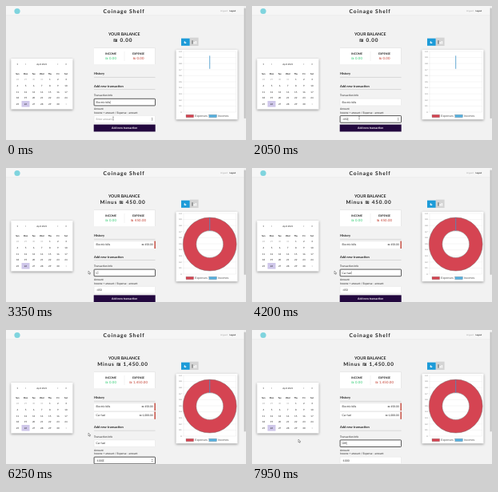
These frames come from a looping animation (300 px wide and 168 px high, 8 s). An HTML page:

```html
<!DOCTYPE html>
<html lang="en">
<head>
<meta charset="utf-8">
<title>Budget tracker</title>
<style>
  html, body { margin: 0; width: 100%; height: 100%; overflow: hidden; background: #f2f2f2; }
  svg { display: block; width: 100vw; height: 100vh; }
  text { font-family: Lato, "DejaVu Sans", sans-serif; fill: #222; text-rendering: geometricPrecision; white-space: pre; }
  .bold { font-weight: 700; }
  .arial text { font-family: "Liberation Sans", sans-serif; fill: #555; }
  .card { fill: #fff; filter: drop-shadow(0 1px 1.6px rgba(0, 0, 0, .4)); }
  .flat { fill: #fff; filter: drop-shadow(0 .4px .6px rgba(0, 0, 0, .25)); }
</style>
</head>
<body>
<svg id="stage" viewBox="0 0 300 168"></svg>
<script>
const LOOP = 8000, SUBMIT_1 = 2150, SUBMIT_2 = 6050, ROW = 10.8;
const RED = '#d54452', BLUE = '#56b1e0', DARK = '#222';
const stage = document.getElementById('stage');

function add(parent, tag, attrs = {}, content = '') {
  const node = document.createElementNS('http://www.w3.org/2000/svg', tag);
  for (const key in attrs) node.setAttribute(key, attrs[key]);
  node.textContent = content;
  return parent.appendChild(node);
}
const group = (attrs, parent = stage) => add(parent, 'g', attrs);
const rect = (parent, x, y, width, height, attrs) => add(parent, 'rect', { x, y, width, height, ...attrs });
const line = (parent, x1, y1, x2, y2, stroke, width = .5) =>
  add(parent, 'line', { x1, y1, x2, y2, stroke, 'stroke-width': width });
const label = (parent, x, y, size, content, attrs) =>
  add(parent, 'text', { x, y, 'font-size': size, ...attrs }, content);
const MID = { 'text-anchor': 'middle' };
const BOLD = { class: 'bold' };
const BOLD_MID = { ...MID, ...BOLD };

// Header and page scrollbar
rect(stage, 0, 0, 300, 11.5, { fill: '#f6f6f6' });
line(stage, 0, 11.6, 300, 11.6, '#e4e4e4', .4);
add(stage, 'circle', { cx: 14, cy: 6.5, r: 3.6, fill: '#7fd4de' });
label(stage, 147.5, 9, 6.7, 'Coinage Shelf', { ...BOLD_MID, 'letter-spacing': .85 });
label(stage, 268, 7.2, 2.5, 'Hi guest', { style: 'fill:#999' });
label(stage, 279.5, 7.2, 2.5, 'Logout', BOLD);
rect(stage, 297.3, 0, 2.7, 168, { fill: '#f1f1f1' });
const scrollThumb = rect(stage, 297.6, 2.6, 2.1, 0, { fill: '#c1c1c1' });

// Balance summary
label(stage, 147.7, 36.8, 5.2, 'YOUR BALANCE', BOLD_MID);
const balance = label(stage, 146, 44.6, 6.4, '', { ...BOLD_MID, 'letter-spacing': .75 });
rect(stage, 110, 52.5, 76.5, 20.5, { class: 'flat' });
line(stage, 148, 57, 148, 69, '#ddd', .4);
label(stage, 131, 60.8, 3.5, 'INCOME', BOLD_MID);
label(stage, 165.5, 60.8, 3.5, 'EXPENSE', BOLD_MID);
label(stage, 131, 67, 4.3, '₪ 0.00', { ...MID, style: 'fill:#2ecc71', 'letter-spacing': .15 });
const expense = label(stage, 165.5, 67, 4.3, '', { ...MID, style: 'fill:#c0392b', 'letter-spacing': .15 });

// History
label(stage, 110, 86.4, 4, 'History', BOLD);
line(stage, 110, 89.4, 186.5, 89.4, '#bbb');
const historyRows = [['Electric bills', '₪ 450.00'], ['Car fuel', '₪ 1,000.00']].map(([name, sum], i) => {
  const row = group({ transform: `translate(0 ${91.6 + i * ROW})` });
  rect(row, 110, 0, 76.5, 9.4, { class: 'flat' });
  rect(row, 185.5, 0, 1.3, 9.4, { fill: '#c0392b' });
  label(row, 112.5, 5.9, 3.4, name);
  label(row, 183.8, 5.9, 3.4, sum, { 'text-anchor': 'end' });
  return row;
});

// Form
const form = group({});
label(form, 110, 101.9, 4, 'Add new transaction', BOLD);
line(form, 110, 104.6, 186.5, 104.6, '#bbb');
label(form, 110, 113.3, 3.3, 'Transaction Info');
label(form, 110, 130.4, 3.3, 'Amount');
label(form, 110, 134.9, 3.3, 'Income + amount / Expense - amount');

function makeField(y) {
  const box = rect(form, 110.1, y, 76.4, 8.6, { fill: '#fff', rx: .7 });
  const mark = rect(form, 112.3, y + 2, 0, 4.7, { fill: '#5c9be6' });
  const text = label(form, 112.5, y + 5.5, 3.4, '');
  const caret = line(form, 0, y + 2.2, 0, y + 6.4, DARK, .25);
  return ({ value, placeholder = '', focused, selected }) => {
    text.textContent = value || placeholder;
    text.style.fill = selected ? '#fff' : value ? DARK : '#888';
    const width = value ? text.getComputedTextLength() : 0;
    box.setAttribute('stroke', focused ? DARK : '#ddd');
    box.setAttribute('stroke-width', focused ? .75 : .4);
    mark.setAttribute('width', selected ? width + .4 : 0);
    caret.setAttribute('x1', 112.8 + width);
    caret.setAttribute('x2', 112.8 + width);
    caret.style.display = focused && !selected ? '' : 'none';
  };
}
const infoField = makeField(116.3);
const amountField = makeField(137.6);
const spinner = add(form, 'path', { d: 'M181.8 141.2l.9 -1.2l.9 1.2zM181.8 142.6l.9 1.2l.9 -1.2z', fill: '#666' });
rect(form, 109.7, 148.6, 77, 8.9, { fill: '#23083f' });
label(form, 148.2, 154.2, 3.5, 'Add new transaction', { ...BOLD_MID, style: 'fill:#fff' });

// Calendar: the first cell is 28 March
rect(stage, 6.3, 66, 77.2, 63.5, { class: 'card' });
const column = i => 14.4 + i * 10.1;
[['«', 0], ['‹', 1], ['›', 5], ['»', 6]].forEach(([sign, i]) => label(stage, column(i), 74.2, 4, sign, MID));
label(stage, column(3), 74.2, 2.8, 'April 2021', MID);
['Sun', 'Mon', 'Tue', 'Wed', 'Thu', 'Fri', 'Sat'].forEach((day, i) => label(stage, column(i), 85.6, 2.7, day, BOLD_MID));
rect(stage, column(1) - 5, 119, 10, 7.6, { fill: '#cfc7ea' });
for (let i = 0; i < 35; i++) {
  const day = i - 3;
  const outside = day < 1 || day > 30;
  const shown = day < 1 ? day + 31 : day > 30 ? day - 30 : day;
  label(stage, column(i % 7), 93.3 + Math.floor(i / 7) * 7.6, 2.9, shown, { ...MID, style: `fill:${outside ? '#aaa' : DARK}` });
}

// Chart switch and chart
rect(stage, 219, 40.6, 10.8, 9.2, { fill: '#1d9bd8' });
add(stage, 'path', { d: 'M224 44a1.5 1.5 0 1 0 1.5 1.5h-1.5z', fill: '#e6f4fb' });
rect(stage, 229.8, 39.6, 10.8, 10.4, { fill: '#d4d4d4' });
[4.5, 2.6, 3.6].forEach((h, i) => rect(stage, 232.2 + i * 2.2, 47.6 - h, 1.5, h, { fill: i ? '#fafafa' : '#888' }));

rect(stage, 212.5, 54.8, 77, 87.5, { class: 'card' });
const chart = group({ class: 'arial' });
for (let i = 0; i <= 10; i++) {
  const y = 57 + i * 7.6;
  line(chart, 220.5, y, 287.5, y, '#e4e4e4', .35);
  label(chart, 219.5, y + .8, 2.4, i === 10 ? '0' : (1 - i / 10).toFixed(1), { 'text-anchor': 'end' });
}
line(chart, 222, 57, 222, 133, '#ddd', .35);
line(chart, 287.5, 57, 287.5, 133, '#e4e4e4', .35);
const ring = 2 * Math.PI * 25.2;
const center = { cx: 254.7, cy: 95.5, fill: 'none' };
const donut = add(chart, 'circle', {
  ...center, r: 25.2, stroke: RED, 'stroke-width': 16.6, transform: 'rotate(-90 254.7 95.5)'
});
const rims = [33.5, 16.9].map(r => add(chart, 'circle', { ...center, r, stroke: '#777', 'stroke-width': .45 }));
line(chart, 254.7, 62.3, 254.7, 78.8, '#3f94c8', .8);
[['Expenses', 225, RED], ['Incomes', 253.8, BLUE]].forEach(([name, x, fill]) => {
  rect(chart, x, 136.2, 9.6, 3.6, { fill, stroke: '#777', 'stroke-width': .3 });
  label(chart, x + 11, 139.3, 3.6, name);
});

// Mouse
const arrow = add(stage, 'path', { d: 'M0 0v3.8l.9 -.8l.6 1.4l.7 -.3l-.6 -1.3h1.2z', fill: '#fff', stroke: '#333', 'stroke-width': .4 });
const beam = add(stage, 'path', { d: 'M-.7 -2h1.4M0 -2v4M-.7 2h1.4', fill: 'none', stroke: '#333', 'stroke-width': .4 });
const mousePath = [
  [0, 134, 141], [2150, 134, 140], [2450, 132, 131], [2750, 132, 131], [3150, 103, 129],
  [6350, 103, 129], [6600, 128, 142], [6700, 128, 142], [7100, 58, 137], [LOOP, 58, 137]
];

const clamp = v => Math.min(1, Math.max(0, v));
const smooth = v => v * v * (3 - 2 * v);
const typed = (t, start, end, word) => word.slice(0, Math.ceil(clamp((t - start) / (end - start)) * word.length));
const show = (node, visible) => { node.style.display = visible ? '' : 'none'; };

function mouseAt(t) {
  const i = mousePath.findIndex(stop => stop[0] > t);
  const [t0, x0, y0] = mousePath[i - 1], [t1, x1, y1] = mousePath[i];
  const k = smooth((t - t0) / (t1 - t0));
  return [x0 + (x1 - x0) * k, y0 + (y1 - y0) * k];
}

function infoAt(t) {
  if (t < 3300) return 'Electric bills';
  if (t < 7250) return typed(t, 3300, 4150, 'Car fuel');
  return typed(t, 7250, 7900, 'Offi');
}

function draw(t) {
  const count = (t >= SUBMIT_1) + (t >= SUBMIT_2);
  balance.textContent = ['₪ 0.00', 'Minus ₪ 450.00', 'Minus ₪ 1,450.00'][count];
  expense.textContent = ['₪ 0.00', '₪ 450.00', '₪ 1,450.00'][count];
  historyRows.forEach((row, i) => show(row, i < count));
  form.setAttribute('transform', `translate(0 ${count * ROW})`);
  scrollThumb.setAttribute('height', 163 * 168 / (198 + count * ROW));

  const inInfo = t < 600 || (t >= 2450 && t < 4700) || t >= 6650;
  infoField({
    value: infoAt(t), focused: inInfo,
    selected: (t >= 2900 && t < 3300) || (t >= 6850 && t < 7250)
  });
  amountField({
    value: t < 5300 ? typed(t, 1150, 1900, '-450') : typed(t, 5300, 5900, '-1000'),
    placeholder: 'Enter amount', focused: !inInfo, selected: t >= 4700 && t < 5300
  });
  show(spinner, t < SUBMIT_1 || !inInfo);

  const sweep = 1 - Math.pow(1 - clamp((t - SUBMIT_1) / 300), 4);
  donut.setAttribute('stroke-dasharray', `${ring * sweep} ${ring}`);
  show(donut, count);
  rims.forEach(rim => show(rim, sweep === 1));

  const [x, y] = mouseAt(t);
  const overField = x > 110;
  show(beam, overField);
  show(arrow, !overField);
  (overField ? beam : arrow).setAttribute('transform', `translate(${x} ${y})`);
}

const start = performance.now();
function tick() {
  draw((performance.now() - start) % LOOP);
  requestAnimationFrame(tick);
}
tick();
</script>
</body>
</html>
```
